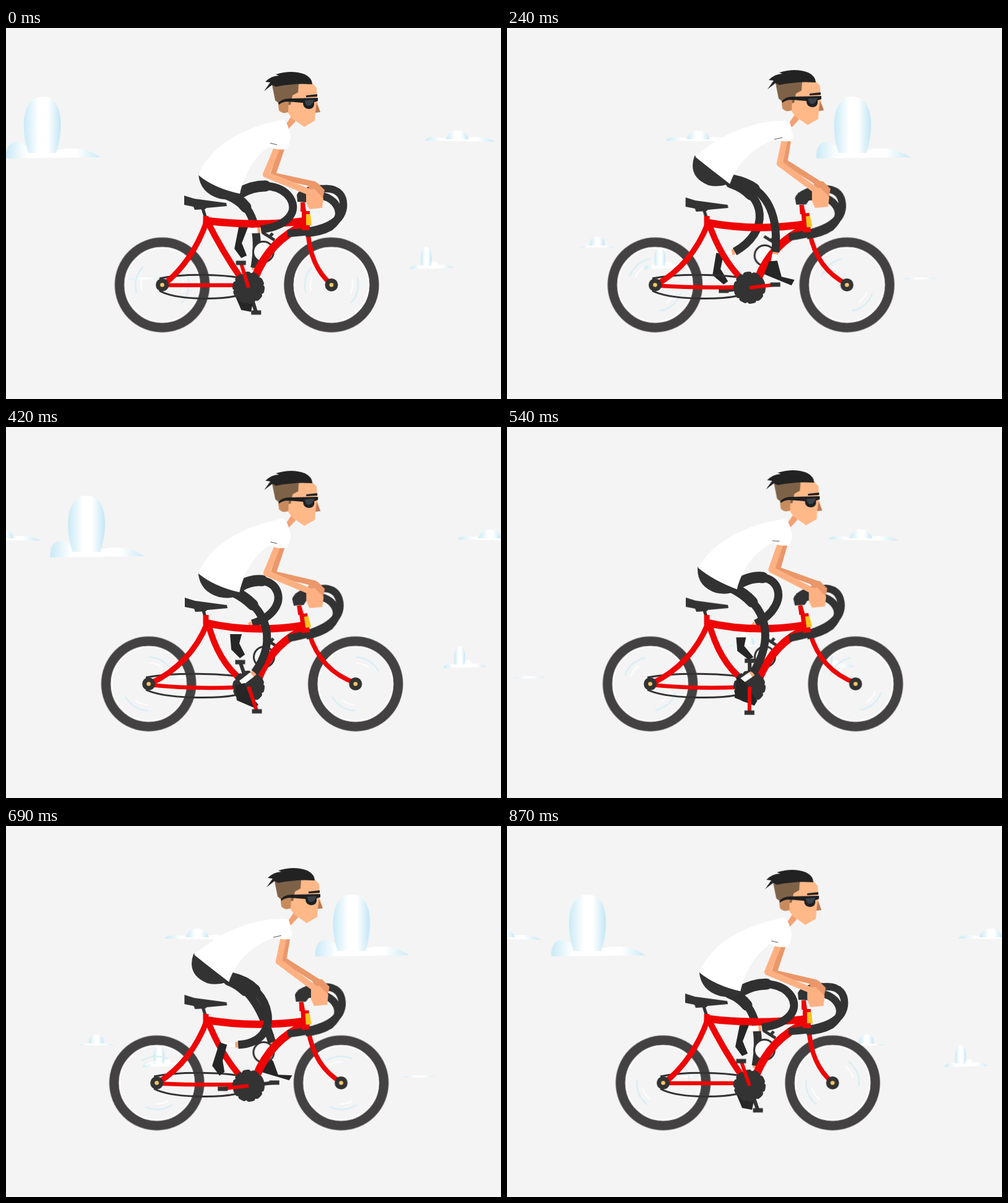
An HTML page without scripts that plays this animation: 800 px wide and 600 px high, repeating every 900 ms.

```html
<!DOCTYPE html>
<html lang="en">
<head>
<meta charset="utf-8">
<title>Cyclist</title>
<style>
  html, body { margin: 0; width: 100%; height: 100%; overflow: hidden; background: #f4f4f4; }
  svg { display: block; width: 800px; height: 600px; }

  /* Clouds and wheel glints step at the film rate. */
  .cloud { fill: url(#bank); animation: drift .45s steps(15) -1ms infinite; }
  .dome { fill: url(#dome); }
  .glint { animation: spin .45s steps(15) -1ms infinite; }
  @keyframes drift { to { transform: translateX(calc(-1 * var(--gap))); } }
  @keyframes spin { to { transform: rotate(2160deg); } }

  /* The bike stretches once per turn of the cranks; the rider bobs twice. */
  .flex, .shift { animation: .45s cubic-bezier(.65, 0, .35, 1) infinite alternate; }
  .bob, .sway { animation: .225s cubic-bezier(.37, 0, .63, 1) infinite alternate; }
  .flex, .bob { animation-name: morph; }
  .shift, .sway { animation-name: move; }
  @keyframes morph { to { d: var(--to); } }
  @keyframes move { to { transform: var(--to); } }
  .rear { --to: translate(-22px, 0); }
  .front { --to: translate(39px, 0); }
  .saddle { --to: translate(1px, 5px); }
  .cage { --to: translate(1px, 10px); }
  .steer { --to: translate(0, 5px) rotate(-8deg); transform-origin: 490px 325px; }
  .head { --to: translate(4px, -3px); }
  .hand { --to: translate(8px, -2px); }

  .crank { transform-origin: 392px 420px; animation: turn .9s cubic-bezier(.37, 0, .63, 1) infinite; }
  .pedal { transform-origin: 392px 378px; animation: level .9s cubic-bezier(.37, 0, .63, 1) infinite; }
  .opposite .crank { animation-name: turn-opposite; }
  .opposite .pedal { animation-name: level-opposite; }
  @keyframes turn { 0% { transform: rotate(-17deg); } 50% { transform: rotate(163deg); } to { transform: rotate(343deg); } }
  @keyframes level { 0% { transform: rotate(17deg); } 50% { transform: rotate(-163deg); } to { transform: rotate(-343deg); } }
  @keyframes turn-opposite { 0% { transform: rotate(163deg); } 50% { transform: rotate(343deg); } to { transform: rotate(523deg); } }
  @keyframes level-opposite { 0% { transform: rotate(-163deg); } 50% { transform: rotate(-343deg); } to { transform: rotate(-523deg); } }

  .stride { animation: stride .9s linear infinite; }
  @keyframes stride {
    0%, 96.67%, to { d: var(--p0); }
    13.33% { d: var(--p1); }
    26.67% { d: var(--p2); }
    46.67% { d: var(--p3); }
    60% { d: var(--p4); }
    76.67% { d: var(--p5); }
  }
  .near .leg {
    --p0: path("M378 267C452 225 510 312 412 326");
    --p1: path("M376 253C440 225 500 280 422 328");
    --p2: path("M365 246C412 255 440 290 434 362");
    --p3: path("M366 265C428 295 436 350 402 397");
    --p4: path("M363 259C425 290 430 345 398 398");
    --p5: path("M366 246C430 260 450 350 375 354");
  }
  .near .sock {
    --p0: path("M388 328L411 327");
    --p1: path("M394 335L421 328");
    --p2: path("M431 380L434 362");
    --p3: path("M380 414L402 397");
    --p4: path("M378 412L398 398");
    --p5: path("M351 354L375 354");
  }
  .near .shoe {
    --p0: path("M376 322L391 322L381 348L389 368L380 372L369 357Z");
    --p1: path("M386 334L398 338L394 356L407 380L400 384L384 368Z");
    --p2: path("M424 377L437 376L444 402L465 407L460 416L416 398Z");
    --p3: path("M370 418L386 414L392 432L408 449L403 455L373 442Z");
    --p4: path("M372 402L386 414L396 432L405 443L400 451L368 438Z");
    --p5: path("M345 350L357 354L350 380L353 398L345 404L333 388Z");
  }
  .far .leg {
    --p0: path("M360 270C400 285 412 330 402 388");
    --p1: path("M358 260C400 285 395 340 383 395");
    --p2: path("M362 250C420 270 425 330 368 362");
    --p3: path("M380 256C440 225 470 295 398 318");
    --p4: path("M380 250C440 222 465 285 402 318");
    --p5: path("M360 249C395 262 415 300 430 350");
  }
  .far .sock {
    --p0: path("M397 406L402 388");
    --p1: path("M378 406L383 395");
    --p2: path("M344 366L368 362");
    --p3: path("M374 334L398 318");
    --p4: path("M379 340L402 318");
    --p5: path("M427 374L430 350");
  }
  .far .shoe {
    --p0: path("M394 405L402 410L400 440L396 459L380 456L370 432Z");
    --p1: path("M372 405L385 408L385 430L401 447L400 454L357 425Z");
    --p2: path("M338 364L350 366L345 390L357 410L350 415L332 400Z");
    --p3: path("M362 335L381 335L377 350L386 368L378 374L364 360Z");
    --p4: path("M370 340L386 340L383 354L398 372L390 376L372 362Z");
    --p5: path("M420 370L432 380L440 402L463 403L458 411L414 398Z");
  }
  .leg { stroke: #303030; stroke-width: 13; }
  .thigh { stroke-width: 18; stroke-linecap: round; stroke-dasharray: 2.5 20; }
  .sock { stroke: #f5a878; stroke-width: 9; }
  .cuff { stroke: #fff; stroke-dasharray: 8 9; }
  .shoe { fill: #262626; }
  .line { fill: none; stroke-linejoin: round; }
  .dark { stroke: #333; }
  .red { stroke: #ee0505; }
</style>
</head>
<body>
<svg viewBox="0 0 800 600">
  <defs>
    <linearGradient id="bank">
      <stop offset="0" stop-color="#c9eaf6"/>
      <stop offset=".22" stop-color="#fff"/>
      <stop offset=".75" stop-color="#fff"/>
      <stop offset="1" stop-color="#c9eaf6"/>
    </linearGradient>
    <linearGradient id="dome">
      <stop offset="0" stop-color="#c9eaf6"/>
      <stop offset=".4" stop-color="#fff"/>
      <stop offset=".65" stop-color="#fff"/>
      <stop offset="1" stop-color="#c3e7f5"/>
    </linearGradient>
    <g id="wheel" class="line">
      <circle r="69" stroke="#434141" stroke-width="15.5"/>
      <circle r="60" stroke="#fff" stroke-width="2.5"/>
      <g class="glint" stroke="#d3edf6" stroke-width="2">
        <path d="M41 14A43 43 0 0 1 8 42M-41 -14A43 43 0 0 1 -8 -42"/>
        <path d="M32 12A34 34 0 0 1 18 29M-32 -12A34 34 0 0 1 -18 -29" stroke="#fff"/>
      </g>
    </g>
    <g id="hub">
      <circle r="10.5" fill="#333"/>
      <circle r="3.3" fill="#f6c765"/>
    </g>
  </defs>

  <g class="cloud" style="--gap:1071px">
    <g id="tall">
      <path d="M0 211Q-1 183 20 184Q32 190 48 200L80 198Q122 188 152 209Z"/>
      <path class="dome" d="M36 202C24 165 24 111 59 111C94 111 93 165 81 202Z"/>
    </g>
    <use href="#tall" x="1071"/>
  </g>
  <g class="cloud" style="--gap:788px">
    <g id="flat">
      <path d="M677 182Q682 173 712 179L747 177Q777 174 790 184Z"/>
      <path class="dome" d="M711 180C715 161 743 161 748 180Z"/>
    </g>
    <use href="#flat" x="788"/>
  </g>
  <g class="cloud" style="--gap:810px">
    <g id="puff">
      <path d="M653 390Q656 380 670 384L688 380Q695 372 699 383Q713 381 723 388Z"/>
      <path class="dome" d="M671 384C665 344 694 344 687 384Z"/>
    </g>
    <use href="#puff" x="810"/>
  </g>
  <g class="cloud" style="--gap:725px">
    <g id="cap">
      <path d="M504 355Q512 350 521 352L544 352Q554 350 561 355Z"/>
      <path class="dome" d="M521 352C517 332 548 332 544 352Z"/>
    </g>
    <use href="#cap" x="725"/>
  </g>
  <g class="cloud" style="--gap:950px">
    <path id="wisp" class="dome" d="M196 406Q221 401 253 405Q226 408 196 406Z"/>
    <use href="#wisp" x="950"/>
  </g>

  <g class="opposite">
    <g class="crank">
      <path class="line dark" d="M392 420V378" stroke-width="6"/>
      <rect class="pedal" x="384" y="374.5" width="16" height="7" fill="#333"/>
    </g>
  </g>
  <g class="far line">
    <path class="stride sock"/>
    <path class="stride sock cuff" pathLength="10"/>
    <path class="stride shoe"/>
    <path class="stride leg"/>
    <path class="stride leg thigh" pathLength="10"/>
  </g>

  <g class="shift rear"><use href="#wheel" x="252.5" y="415.5"/></g>
  <g class="shift front"><use href="#wheel" x="526" y="415.5"/></g>

  <g class="line dark" stroke-width="3">
    <path class="flex" d="M248 405C290 396 350 399 378 404M248 425C275 440 340 440 374 433"
      style="--to:path('M226 405C275 396 350 399 378 404M226 425C258 440 340 440 374 433')"/>
    <g class="shift cage">
      <circle cx="416" cy="362" r="16.5" fill="#fafafa"/>
      <path d="M415 331L434 343M426 338L431 332" stroke-width="5"/>
    </g>
  </g>

  <g class="shift saddle">
    <path class="line dark" d="M317 289L323 308" stroke-width="5"/>
    <path d="M288 271L304 276L356 283L357 288L324 291L322 293L305 294L303 289L288 286Z" fill="#333"/>
  </g>

  <g class="line red" stroke-width="9">
    <path class="flex" d="M254 416Q310 416 374 416" stroke-width="6.5"
      style="--to:path('M232 417Q300 424 374 421')"/>
    <path class="flex" d="M324 314Q301 378 255 415" style="--to:path('M325 318Q298 384 233 415')"/>
    <path class="flex" d="M324 310Q350 362 380 405" stroke-width="10" style="--to:path('M326 315Q342 380 382 410')"/>
    <path class="flex" d="M319 311Q400 322 484 312" stroke-width="12" style="--to:path('M320 316Q400 335 486 320')"/>
    <path class="flex" d="M484 318Q426 343 402 404" stroke-width="13" style="--to:path('M488 325Q432 347 407 408')"/>
    <path class="flex" d="M488 328Q491 385 526 415" stroke-width="7.5" style="--to:path('M490 334Q508 394 565 414')"/>
    <path d="M323 304V320" stroke-width="9"/>
  </g>

  <g class="shift rear"><use href="#hub" x="252.5" y="415.5"/></g>
  <g class="shift front"><use href="#hub" x="526" y="415.5"/></g>

  <circle cx="392" cy="420" r="24" fill="#333"/>
  <circle class="line dark" cx="392" cy="420" r="22" stroke-width="8" stroke-linecap="round" stroke-dasharray="5.8 8.02"/>

  <g class="shift steer">
    <g class="line dark" stroke-width="12">
      <path d="M478 268Q495 258 512 260C540 257 547 275 545 291C541 318 505 330 455 332"/>
      <path d="M481 271Q518 266 532 284Q547 304 524 322Q508 331 484 332"/>
    </g>
    <path d="M471 281L470 270Q474 260 488 260L502 264L487 282Z" fill="#333"/>
    <path d="M476 282H483L485 296H491V327H478V297H476Z" fill="#ee0505"/>
    <path d="M485 301H492L494 319H485Z" fill="#fbc31c"/>
  </g>

  <g class="near line">
    <path class="stride sock"/>
    <path class="stride sock cuff" pathLength="10"/>
    <path class="stride shoe"/>
    <path class="stride leg"/>
    <path class="stride leg thigh" pathLength="10"/>
  </g>
  <g class="crank">
    <path class="line red" d="M392 420V378" stroke-width="6"/>
    <rect class="pedal" x="384" y="374.5" width="16" height="7" fill="#333"/>
  </g>

  <path class="bob" fill="#333" d="M311 237Q314 267 345 276Q374 282 388 262L360 240Z"
    style="--to:path('M303 206Q291 240 325 254Q350 260 374 243L340 215Z')"/>

  <g class="line" stroke="#ea976a">
    <path class="bob" d="M446 194L431 238L500 253" stroke-width="9" style="--to:path('M455 180L449 216L513 257')"/>
    <path class="sway hand" d="M486 249L503 250L515 262L512 275L496 277Z" fill="#ea976a" stroke="none"/>
  </g>
  <g class="line" stroke="#fdb183">
    <path class="bob" d="M438 194L420 237L492 266" stroke-width="10" style="--to:path('M449 180L441 219L505 267')"/>
    <path class="sway hand" d="M485 264L498 260L513 275L511 291L490 293L485 282Z" fill="#fdb183" stroke="none"/>
  </g>

  <g class="sway head">
    <path d="M463 140L449 161L457 163L468 151Z" fill="#f2a173"/>
    <path d="M470 91L495 89L502 97L503 120L508 136L500 137L499 150L482 160L462 146L455 136L459 110Z" fill="#ffb888"/>
    <path d="M430 92L473 90L472 104L463 109L460 124L446 126L435 117Z" fill="#7e6248"/>
    <path d="M440 125Q441 117 450 118L457 120L456 136Q447 140 441 133Z" fill="#c88b5d"/>
    <path d="M502 121L508 136L500 137Z" fill="#bd7955"/>
    <path d="M417 102L427 88L419 87Q429 77 441 77L436 75Q462 67 483 75Q495 81 495 91Q465 89 436 95L430 92Z" fill="#222"/>
    <path d="M485 109L503 107V111L485 112Z" fill="#222"/>
    <path d="M440 122Q445 114 458 114L504 113V118L498 120Q499 131 489 131Q480 130 480 121L456 119Q447 119 441 124Z" fill="#1d1f21"/>
    <path d="M483 117L498 116Q495 126 488 126Q483 124 483 117Z" fill="#394148"/>
  </g>

  <path class="bob" fill="#fff"
    d="M447 148C400 158 335 180 311 238Q336 259 378 268C386 232 404 206 425 192Q438 198 454 196Q463 178 458 167Q455 152 447 148Z"
    style="--to:path('M456 151C420 146 355 162 304 208Q330 229 360 252C370 222 394 194 434 180Q446 184 460 183Q465 173 460 167Q459 155 456 151Z')"/>
  <path class="bob line" stroke="#555" d="M427 186L438 189" style="--to:path('M432 180L445 177')"/>
</svg>
</body>
</html>
```
